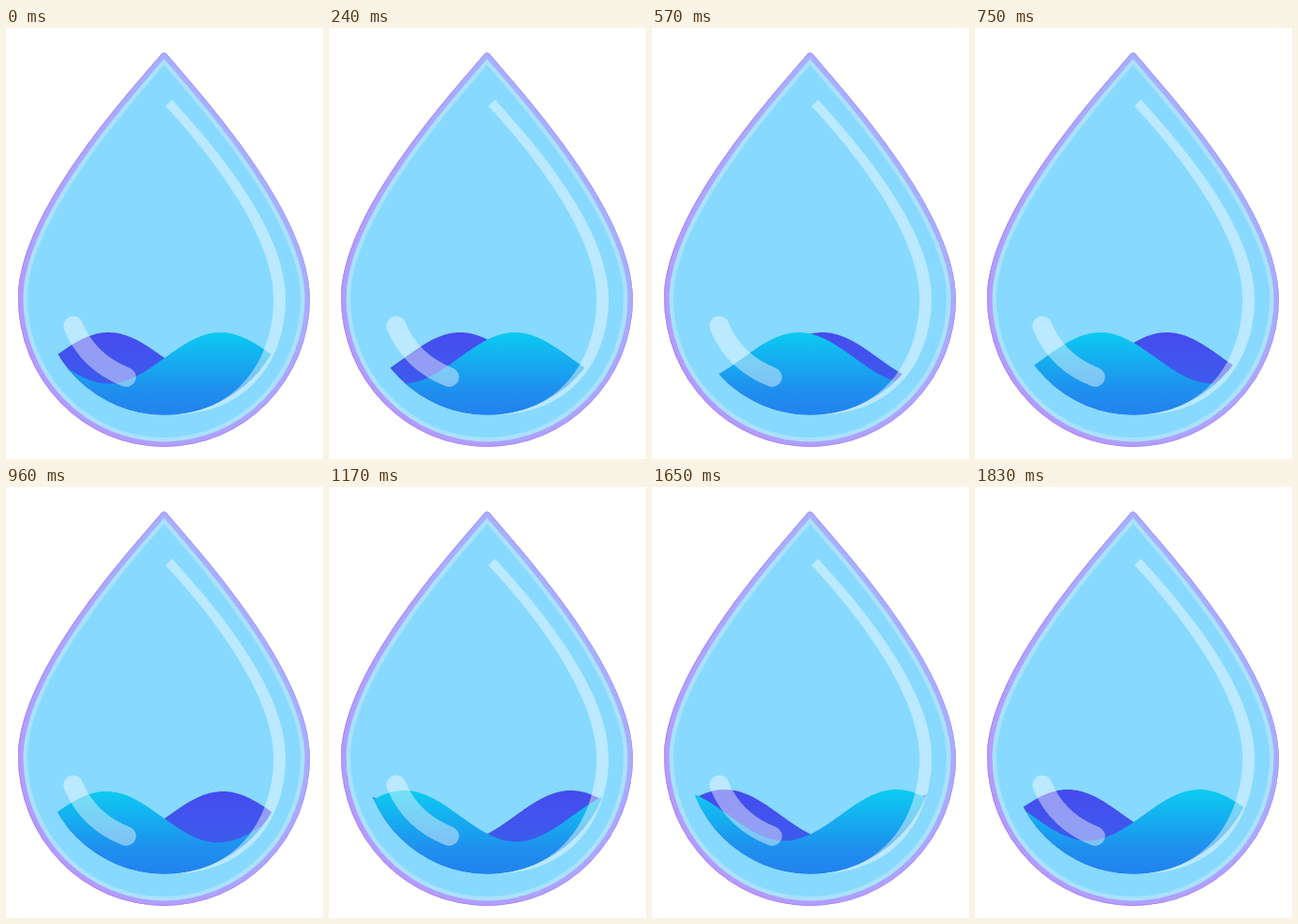
Write an HTML page that moves like this. It is 340 by 463 pixels and loops after 1.86 s.

```html
<!DOCTYPE html>
<html lang="en">
<head>
<meta charset="utf-8">
<title>Water drop</title>
<style>
  html, body { margin: 0; height: 100%; overflow: hidden; background: #fff; }
  svg { display: block; }
</style>
</head>
<body>
<svg width="340" height="463" viewBox="0 0 340 463">
  <defs>
    <path id="drop" d="M164.500 30.500Q169.500 22.500 174.500 30.500C224.500 88 325.500 204 326 290A156.500 160 0 0 1 13 290C13.500 204 114.500 88 164.500 30.500Z"/>
    <clipPath id="inDrop"><use href="#drop"/></clipPath>
    <clipPath id="bowl"><circle cx="170" cy="282.500" r="133"/></clipPath>
    <linearGradient id="rim" x1="0" y1="1" x2=".8" y2="0">
      <stop stop-color="#b597ff"/><stop offset="1" stop-color="#a4b4fd"/>
    </linearGradient>
    <linearGradient id="edge" x1="0" y1="1" x2="1" y2=".3">
      <stop stop-color="#b57cff"/><stop offset="1" stop-color="#a99cfd"/>
    </linearGradient>
    <linearGradient id="cyan" gradientUnits="userSpaceOnUse" x1="0" y1="326" x2="0" y2="415">
      <stop stop-color="#0ccbf1"/><stop offset=".7" stop-color="#1f8fee"/><stop offset="1" stop-color="#2183ee"/>
    </linearGradient>
    <linearGradient id="indigo" gradientUnits="userSpaceOnUse" x1="0" y1="326" x2="0" y2="385">
      <stop stop-color="#464bee"/><stop offset="1" stop-color="#3c5cec"/>
    </linearGradient>
  </defs>
  <g clip-path="url(#inDrop)" fill="none">
    <use href="#drop" fill="#87d9ff" stroke="#aae1fb" stroke-width="20"/>
    <use href="#drop" stroke="url(#rim)" stroke-width="11"/>
    <use href="#drop" stroke="url(#edge)" stroke-width="2"/>
  </g>
  <g clip-path="url(#bowl)">
    <path id="back" fill="url(#indigo)"/>
    <path id="front" fill="url(#cyan)"/>
  </g>
  <g fill="#fff" opacity=".43">
    <path d="M178 77C226 129 300 218 300 290C300 355 262 414 180 415.500C254 410 287 350 287 290C287 222 217 133 171 84Z"/>
    <path d="M72 320Q88 359 129 375" fill="none" stroke="#fff" stroke-width="21" stroke-linecap="round"/>
  </g>
</svg>
<script>
const LOOP = 1860, STEP = 30, WAVE = 240, AMP = 27.5;
const back = document.getElementById('back');
const front = document.getElementById('front');

const ramp = (t, from, to) => Math.min(1, Math.max(0, (t - from) / (to - from)));

// A filled sine surface with one crest at x = crest
function surface(crest, mid) {
  let d = 'M30 430';
  for (let x = 30; x <= 310; x += 2) {
    const y = mid - AMP * Math.cos((x - crest) / WAVE * 2 * Math.PI);
    d += `L${x} ${y.toFixed(2)}`;
  }
  return d + 'L310 430Z';
}

function draw(now) {
  const t = Math.floor(now % LOOP / STEP) * STEP;
  // The crest drifts left, a little slower near the end of the loop
  const crest = 230 - 176 * ramp(t, 0, 1380) - 57 * ramp(t, 1380, LOOP);
  const mid = 354.5 - 2 * ramp(t, 960, 1380);
  front.setAttribute('d', surface(crest, mid));
  back.setAttribute('d', surface(340 - crest, mid));
}

const start = performance.now();
function tick() {
  draw(performance.now() - start);
  requestAnimationFrame(tick);
}
tick();
</script>
</body>
</html>
```
